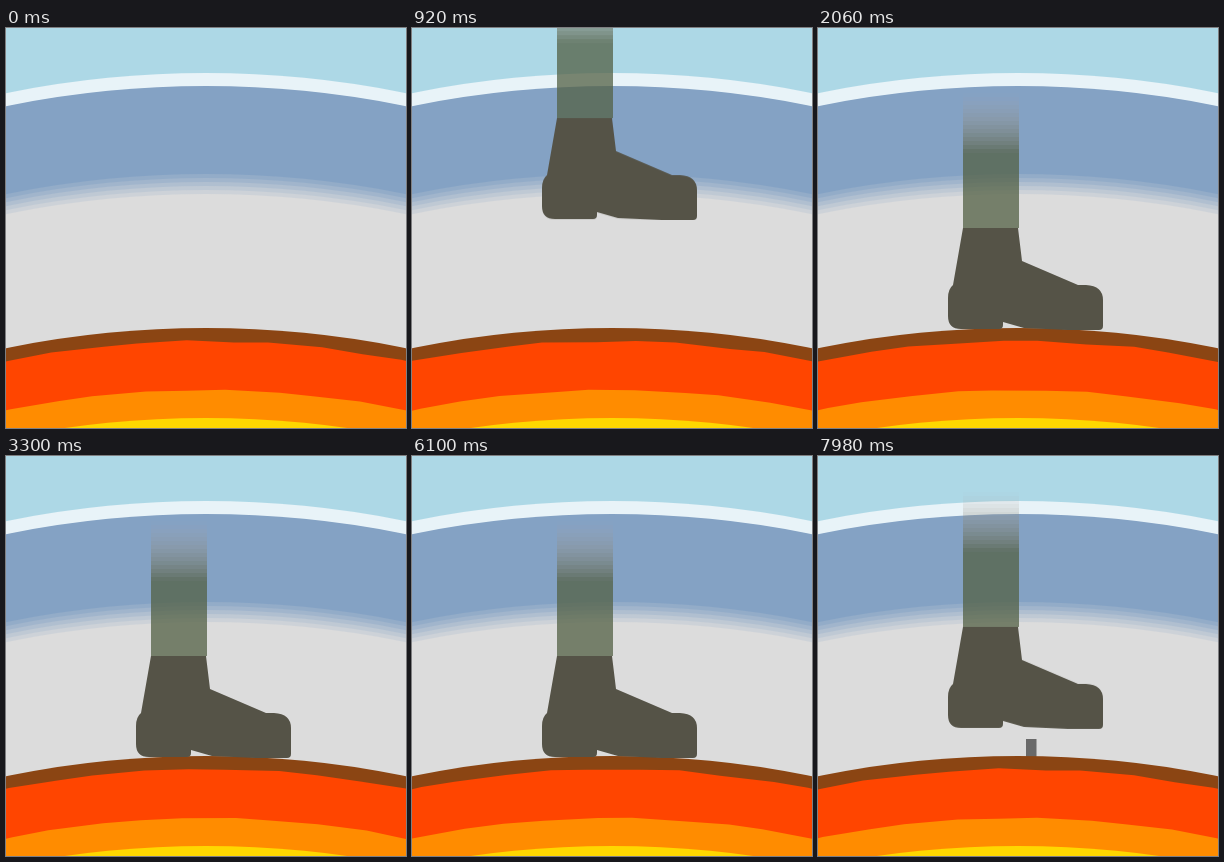
An HTML page for the animation above (8 s loop, 400 by 400 pixels).

```html
<!DOCTYPE html>
<html lang="en">
<head>
<meta charset="utf-8">
<title>Boot on a planet</title>
<style>
  html, body { margin: 0; width: 100%; height: 100%; overflow: hidden; background: #add8e6; }
  svg { display: block; width: 100vw; height: 100vh; }
  .foot { animation: stomp 8s linear infinite; }
  .post { animation: rise 8s linear infinite; }
  .crawler { transform-origin: 200px 1300px; }
  .left { animation: enter-left 8s linear infinite; }
  .right { animation: enter-right 8s linear infinite; }
  @keyframes stomp {
    0% { transform: translateY(-302px); }
    18.1%, 98% { transform: translateY(0); }
    100% { transform: translateY(-33px); }
  }
  @keyframes rise {
    0%, 98% { transform: translateY(18px); }
    99.7%, 100% { transform: translateY(0); }
  }
  @keyframes enter-left {
    0%, 98% { transform: rotate(-12.4deg); }
    99.75% { transform: rotate(-10.25deg); }
    100% { transform: rotate(-9.95deg); }
  }
  @keyframes enter-right {
    0%, 98% { transform: rotate(12.4deg); }
    99.75% { transform: rotate(10.25deg); }
    100% { transform: rotate(9.95deg); }
  }
</style>
</head>
<body>
<svg viewBox="0 0 400 400">
  <defs>
    <path id="grub" d="M192 303.5Q195 301.5 199 303Q203 301.5 207 303Q211 303.5 211 307Q212 311 208 312Q204 313.5 200 312Q196 313.5 192 312Q188.500 311 189 308Q189 304 192 303.500Z"/>
  </defs>
  <rect width="400" height="400" fill="#add8e6"/>
  <g id="air"></g>
  <g class="crawler left"><use href="#grub" fill="#6cc261"/></g>
  <g class="crawler right"><use href="#grub" fill="#f0f"/></g>
  <rect class="post" x="208" y="283" width="10.500" height="19" fill="#696969"/>
  <g id="ground"></g>
  <path id="red" fill="#ff4500"/>
  <path id="orange" fill="#ff8c00"/>
  <g id="core"></g>
  <g class="foot">
    <g id="leg" shape-rendering="crispEdges"></g>
    <path fill="#555347" d="M145 200H200L204 233L260 257H268Q285 258 285 272V298Q285 302 281 302H250L206 300L185 294V297Q185 301 181 301H143Q130 301 130 288V270Q130 261 135 257Z"/>
  </g>
</svg>
<script>
  const LOOP = 8000, RADIUS = 1000;
  const BLUE = [132, 162, 196], GREY = [220, 220, 220];
  const $ = id => document.getElementById(id);

  function add(parent, tag, attrs) {
    const node = document.createElementNS('http://www.w3.org/2000/svg', tag);
    for (const key in attrs) node.setAttribute(key, attrs[key]);
    $(parent).append(node);
  }

  const mix = (a, b, k) => `rgb(${a.map((v, i) => Math.round(v + (b[i] - v) * k))})`;

  const layer = (parent, top, fill) =>
    add(parent, 'circle', { cx: 200, cy: top + RADIUS, r: RADIUS, fill });

  layer('air', 45, '#e8f3f8');
  layer('air', 58, mix(BLUE, GREY, 0));
  for (let i = 0; i < 6; i++) layer('air', 146 + 4 * i, mix(BLUE, GREY, (i + 1) / 6));
  layer('ground', 300, '#8b4513');
  layer('core', 390, '#ffd700');

  // Trouser leg: stepped fade, then an even translucent block.
  const OLIVE = [83, 96, 68], HAZE = [190, 170, 165], BANDS = 15;
  const legPart = (y, height, k) => add('leg', 'rect', {
    x: 145, y, width: 55.5, height, fill: mix(HAZE, OLIVE, k), 'fill-opacity': 0.75 * k
  });
  for (let i = 0; i < BANDS; i++) legPart(65 + 4 * i, 4, (i + 0.5) / BANDS);
  legPart(125, 74.5, 1);

  // Molten edge: a coarse polyline whose corners drift around the arc.
  function moltenEdge(top, sway, phase, turn) {
    let d = 'M-40 440';
    for (let i = 0; i <= 11; i++) {
      const x = -40 + i * 44 + 6 * Math.sin(i * 2.3 + phase + turn);
      const arc = top + RADIUS - Math.sqrt(RADIUS ** 2 - (x - 200) ** 2);
      const wave = Math.sin(i * 2.1 + phase + 3 * turn) + 0.6 * Math.sin(i * 3.7 - phase + 5 * turn);
      d += `L${x.toFixed(2)} ${(arc + sway * wave).toFixed(2)}`;
    }
    return d + 'L440 440Z';
  }

  function draw(now) {
    const turn = (now % LOOP) / LOOP * 2 * Math.PI;
    $('red').setAttribute('d', moltenEdge(313, 0.7, 1.2, turn));
    $('orange').setAttribute('d', moltenEdge(362, 0.4, 4.1, turn));
    requestAnimationFrame(draw);
  }
  requestAnimationFrame(draw);
</script>
</body>
</html>
```
